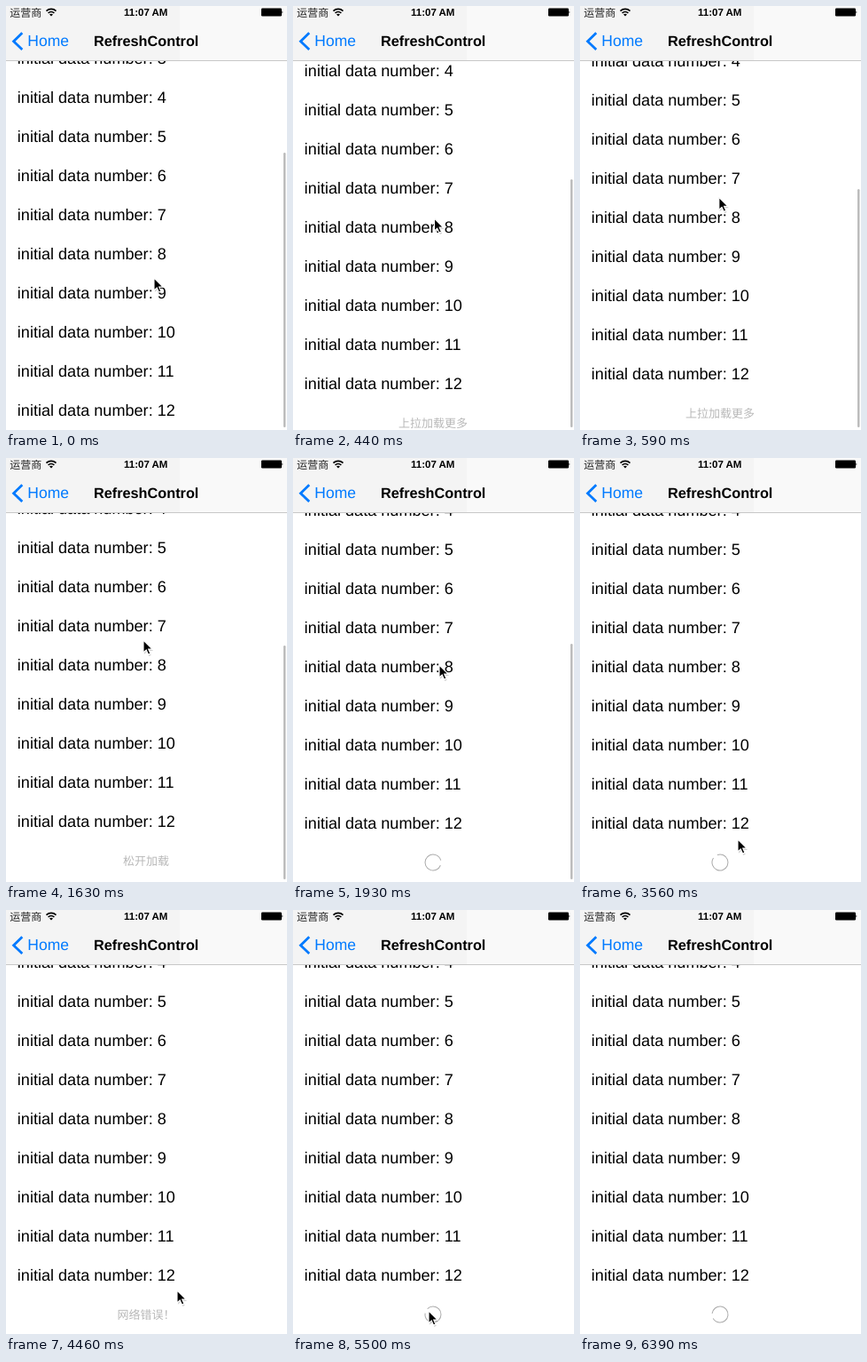
Recreate the animation shown at these times as an HTML page. Size 317 by 477 pixels, loop 6.54 s.

```html
<!DOCTYPE html>
<html lang="zh-CN">
<head>
<meta charset="utf-8">
<title>RefreshControl</title>
<style>
  html, body { margin: 0; width: 100%; height: 100%; overflow: hidden; background: #fff; }
  svg { display: block; width: 317px; height: 477px; text-rendering: geometricPrecision; }
  text { font-family: "Liberation Sans", Arial, sans-serif; white-space: pre; }
  .row { font-size: 18.1px; }
  .hint { font: 13px "Noto Sans CJK SC", "Noto Sans CJK", sans-serif; fill: #b8b8b8; text-anchor: middle; }
  .carrier { font: 12px "Noto Sans CJK SC", "Noto Sans CJK", sans-serif; fill: #222; }
  .bold { font-weight: bold; }
</style>
</head>
<body>
<svg viewBox="0 0 317 477">
  <rect width="317" height="477" fill="#fff"/>
  <g id="list">
    <g id="rows"></g>
    <text id="hint" class="hint" x="158" y="503.5"></text>
    <g transform="translate(158 499)">
      <circle id="spinner" r="9" fill="none" stroke="#aaa" pathLength="360" stroke-dasharray="324 36"/>
    </g>
  </g>
  <rect id="scrollbar" x="313" width="2.5" rx="1.25" fill="#bcbcbc"/>

  <rect width="317" height="61" fill="#f9f9f9"/>
  <rect width="196" height="61" fill="#f4f4f4"/>
  <rect y="61" width="317" height="1" fill="#c8c8c8"/>

  <text class="carrier" x="4.3" y="11.5">运营商</text>
  <g fill="none" stroke="#000" stroke-width="1.7">
    <path d="M45.5 5.6A8 8 0 0 1 56.5 5.6M47.6 8A5 5 0 0 1 54.4 8"/>
    <path d="M51 11.6L49 9.6A2.9 2.9 0 0 1 53 9.6Z" fill="#000" stroke="none"/>
  </g>
  <text class="bold" x="133" y="11" font-size="11.5">11:07 AM</text>
  <rect x="288" y="2.5" width="23" height="9" rx="1.2"/>
  <path d="M311.5 5.3Q313.3 7 311.5 8.7Z"/>

  <path d="M18.3 30.3L8.6 39.7L18.3 49.1" fill="none" stroke="#007aff" stroke-width="2.8"/>
  <text x="24.3" y="45" font-size="17.5" fill="#007aff">Home</text>
  <text class="bold" x="98.9" y="45" font-size="16.3">RefreshControl</text>

  <g id="cursor">
    <g transform="translate(0 -1) scale(.92)">
      <path d="M1 2V17L4.5 14L7 19.5L9.5 18.3L7 13H12Z" opacity=".18"/>
      <path d="M0 0V15.2L3.5 12L6 17.5L8.6 16.4L6.2 11H11Z" stroke="#fff" stroke-width="1.2"/>
    </g>
  </g>
</svg>
<script>
const LOOP = 6540, BEATS = 44, BEAT = 148.6, LEAD = 6;
const READY = 11, LOADING = 13, FAILED = 28, RETRY = 36;
const ROW = 44, PULL_RATIO = 0.455;

const linear = p => p;
const smooth = p => p * p * (3 - 2 * p);
const home = { x: 167, y: 307 };
const moves = [
  { from: 0, to: 4.8, x: 156, y: 209, ease: smooth },
  { from: 10, to: 11, x: 155, y: 206 },
  { from: 12, to: 17, x: 205, y: 346 },
  { from: 17, to: 23, x: 178, y: 430 },
  { from: 27, to: 30, x: 193, y: 429 },
  { from: 32, to: 34, x: 153, y: 452 },
  { from: 37, to: 42, x: 292, y: 480 }
];

const $ = id => document.getElementById(id);
const clamp = p => Math.min(1, Math.max(0, p));
const set = (id, attrs) => {
  for (const name in attrs) $(id).setAttribute(name, attrs[name]);
};

function cursorAt(beat) {
  return moves.reduce((pos, { from, to, x, y, ease = linear }) => {
    const p = ease(clamp((beat - from) / (to - from)));
    return { x: pos.x + (x - pos.x) * p, y: pos.y + (y - pos.y) * p };
  }, home);
}

function hintAt(beat) {
  if (beat < READY) return "上拉加载更多";
  if (beat < LOADING) return "松开加载";
  return beat >= FAILED && beat < RETRY ? "网络错误！" : "";
}

for (let n = 3; n <= 12; n++) {
  const row = document.createElementNS("http://www.w3.org/2000/svg", "text");
  set.call(null, "rows", {});
  row.setAttribute("class", "row");
  row.setAttribute("x", 12.8);
  row.setAttribute("y", 109 + (n - 4) * ROW);
  row.textContent = "initial data number: " + n;
  $("rows").append(row);
}

function draw(time) {
  const beat = Math.floor((time % LOOP + LEAD) / BEAT) % BEATS;
  const { x, y } = cursorAt(beat);
  // The list follows the drag with resistance, then rests one row up
  const scroll = beat <= READY ? Math.round((home.y - y) * PULL_RATIO) : ROW;
  const hint = hintAt(beat);
  // One turn per second
  const turn = (beat * BEAT - 2520) * 0.36 - 127;

  set("list", { transform: `translate(0 ${-scroll})` });
  set("cursor", { transform: `translate(${x} ${y})` });
  set("scrollbar", { y: 165 + scroll, height: 309 - scroll, opacity: clamp((16 - beat) / 2) });
  set("spinner", { transform: `rotate(${turn})`, visibility: hint ? "hidden" : "visible" });
  $("hint").textContent = hint;
}

const start = performance.now();
function tick() {
  draw(performance.now() - start);
  requestAnimationFrame(tick);
}
tick();
</script>
</body>
</html>
```
